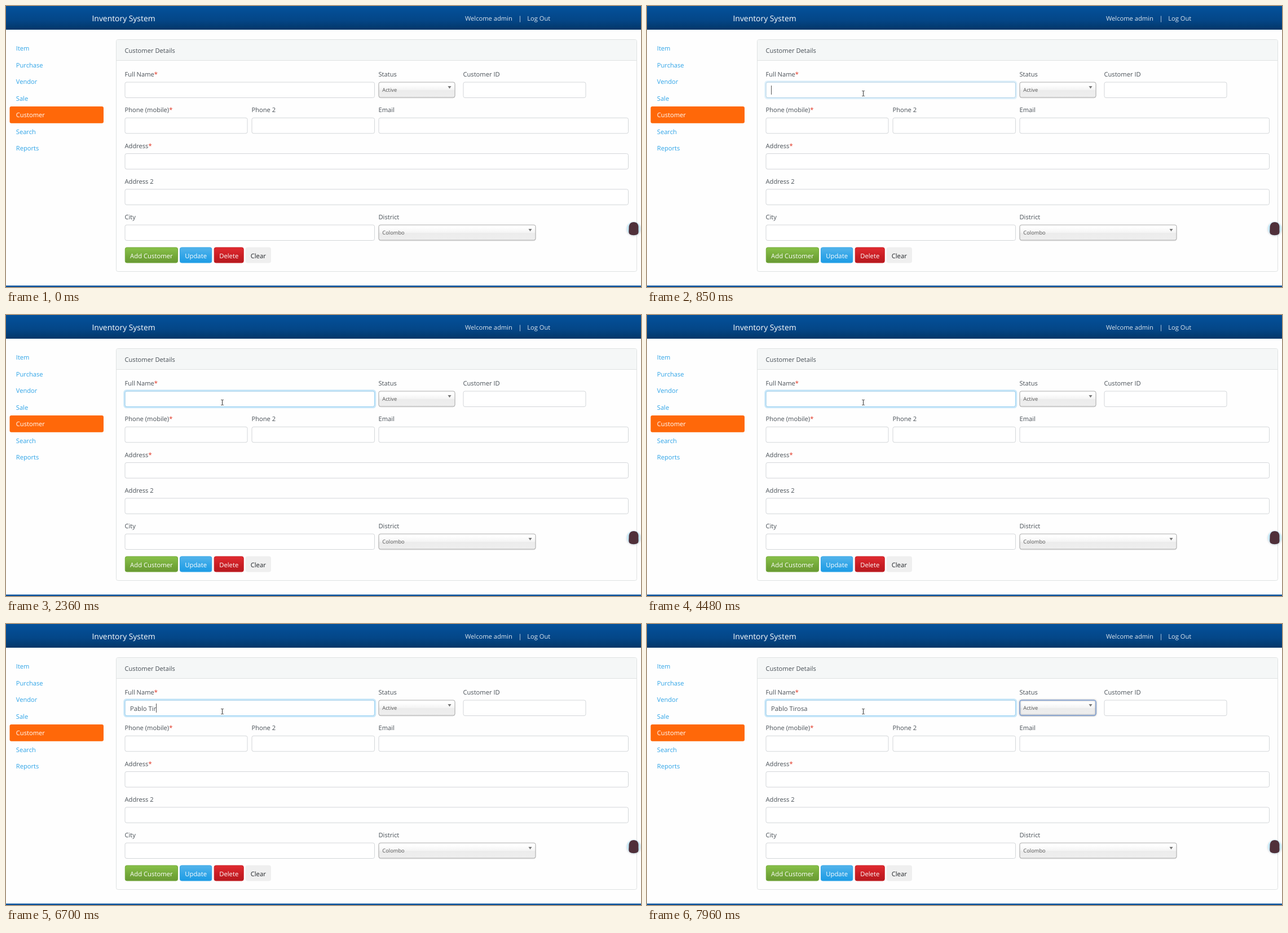
An HTML page for the animation above (8 s loop, 1126 by 498 pixels).

```html
<!DOCTYPE html>
<html lang="en">
<head>
<meta charset="utf-8">
<title>Customer form</title>
<style>
  html, body { margin: 0; width: 100%; height: 100%; overflow: hidden; background: #fefefe; }
  svg { display: block; width: 1126px; height: 498px; }
  text { font: 11.15px "Open Sans", "Noto Sans", sans-serif; fill: #495057; white-space: pre; text-rendering: geometricPrecision; }
  .brand { font-size: 13.9px; fill: #fff; }
  .nav { fill: #dde6ef; }
  .link { fill: #2fa4e7; }
  .small { font-size: 9.3px; fill: #555; }
  .white { fill: #fff; }
  .dark { fill: #212529; }
  .button { text-anchor: middle; font-size: 11.3px; }
  .field { fill: #fff; stroke: #d3d6d9; }
  .select { fill: url(#select); stroke: #aaa; }
  #name { font-size: 11.3px; }
</style>
</head>
<body>
<svg viewBox="0 0 1126 498">
  <defs>
    <linearGradient id="header" x2="0" y2="1"><stop stop-color="#04519b"/><stop offset=".6" stop-color="#044687"/><stop offset="1" stop-color="#033769"/></linearGradient>
    <linearGradient id="green" x2="0" y2="1"><stop stop-color="#88c149"/><stop offset=".6" stop-color="#73a839"/><stop offset="1" stop-color="#699934"/></linearGradient>
    <linearGradient id="blue" x2="0" y2="1"><stop stop-color="#54b4eb"/><stop offset=".6" stop-color="#2fa4e7"/><stop offset="1" stop-color="#1d9ce5"/></linearGradient>
    <linearGradient id="red" x2="0" y2="1"><stop stop-color="#e12b31"/><stop offset=".6" stop-color="#c71c22"/><stop offset="1" stop-color="#b5191f"/></linearGradient>
    <linearGradient id="select" x2="0" y2="1"><stop offset=".15" stop-color="#fff"/><stop offset=".5" stop-color="#f4f4f4"/><stop offset=".53" stop-color="#ececec"/><stop offset="1" stop-color="#eee"/></linearGradient>
    <filter id="soft" x="-50%" y="-50%" width="200%" height="200%"><feGaussianBlur stdDeviation="1.5"/></filter>
  </defs>

  <rect width="1126" height="42" fill="url(#header)"/>
  <text class="brand" x="152.5" y="27">Inventory System</text>
  <text class="nav" x="814" y="26">Welcome admin</text>
  <text class="nav" x="908.5" y="26">|</text>
  <text class="nav" x="924.3" y="26">Log Out</text>
  <rect y="495.5" width="1126" height="2.5" fill="#04519b"/>

  <rect x="195.5" y="59.5" width="923" height="411" rx="3" fill="#fefefe" stroke="#dfe2e2"/>
  <path d="M196 96V62.500q0-2.500 2.500-2.500H1115.500q2.500 0 2.500 2.500V96z" fill="#f5f7f7"/>
  <path d="M196 96.500H1118" stroke="#dfe2e2"/>
  <text x="210.500" y="83">Customer Details</text>

  <g id="form"></g>

  <g id="glow" fill="none">
    <rect x="209.500" y="133.500" width="445.500" height="30.500" rx="4" stroke="#cbe8f9" stroke-width="2.500"/>
    <rect x="211" y="135" width="442.500" height="27.500" rx="3" stroke="#97d1f3"/>
  </g>
  <text id="name" x="220" y="154"></text>
  <rect id="caret" y="141" width="1" height="16" fill="#555"/>

  <g id="statusFocus" fill="none">
    <rect x="661" y="135" width="135" height="27" rx="3.500" stroke="#000" stroke-width="2" opacity=".3" filter="url(#soft)"/>
    <rect x="661" y="135" width="135" height="27" rx="3.500" stroke="#6c9ff0"/>
  </g>

  <circle cx="1113" cy="395.500" r="12.500" fill="#789" opacity=".3" filter="url(#soft)"/>
  <circle cx="1113" cy="394.500" r="12" fill="#c9ecfa"/>
  <path d="M1113 383c6 0 9 4 8.500 10-.3 5 1 8-1 11-4 3-11 3-15 0-2-3-1-6-1-11 0-6 3-10 8.500-10z" fill="#50303a"/>

  <g id="pointer">
    <path id="arrow" d="M0 0V13L3 10.300 5 14.500 7 13.600 5.100 9.600H9z" fill="#fff" stroke="#222" stroke-width=".8"/>
    <path id="beam" d="M-2.200-4.600H-.6L0-4 .6-4.600H2.200M0-4V4M-2.200 4.600H-.6L0 4 .6 4.600H2.200" fill="none" stroke="#333"/>
  </g>
</svg>
<script>
const $ = id => document.getElementById(id);

const label = (x, y, text, cls = '') => `<text class="${cls}" x="${x}" y="${y}">${text}</text>`;
const box = (x, y, w, h, cls, extra = '') =>
  `<rect class="${cls}" x="${x}" y="${y}" width="${w}" height="${h}" rx="3" ${extra}/>`;
const field = (x, y, w, text, required) =>
  label(x - .5, y - 10, text + (required ? '<tspan fill="#e0301e">*</tspan>' : '')) +
  box(x, y, w, 27.5, 'field');
const select = (x, y, w, text, value) =>
  label(x - .5, y - 10, text) +
  `<rect x="${x}" y="${y + 1}" width="${w}" height="27" rx="3.5" fill="none" stroke="#ddd"/>` +
  box(x, y, w, 27, 'select') + label(x + 6.3, y + 16.5, value, 'small') +
  `<path d="M${x + w - 12.5} ${y + 7}h6l-3 4.5z" fill="#777"/>`;
const button = (x, w, text, fill, edge, cls) =>
  box(x, 428, w, 27, '', `fill="${fill}" stroke="${edge}"`) +
  label(x + w / 2, 446.5, text, 'button ' + cls);

const menu = ['Item', 'Purchase', 'Vendor', 'Sale', 'Customer', 'Search', 'Reports'];
$('form').innerHTML =
  box(6.5, 178, 166.5, 29.7, '', 'fill="#ff6809"') +
  menu.map((text, i) => label(17.8, 79.3 + i * 29.5, text, text === 'Customer' ? 'white' : 'link')).join('') +
  field(211, 135, 442.5, 'Full Name', true) +
  select(661, 135, 135, 'Status', 'Active') +
  field(811, 135, 217, 'Customer ID') +
  field(211, 198.3, 217, 'Phone (mobile)', true) +
  field(436, 198.3, 217.5, 'Phone 2') +
  field(661, 198.3, 442.5, 'Email') +
  field(211, 261.6, 892.5, 'Address', true) +
  field(211, 324.8, 892.5, 'Address 2') +
  field(211, 388, 442.5, 'City') +
  select(661, 388, 278, 'District', 'Colombo') +
  button(211.3, 93.2, 'Add Customer', 'url(#green)', '#73a839', 'white') +
  button(308.5, 56.3, 'Update', 'url(#blue)', '#2fa4e7', 'white') +
  button(369.2, 52, 'Delete', 'url(#red)', '#c71c22', 'white') +
  button(425, 44.5, 'Clear', '#efefef', '#efefef', 'dark');

const fullName = 'Pablo Tirosa';
const keyTimes = [4750, 4950, 5560, 5630, 5770, 6050, 6310, 6440, 6700, 6840, 6970, 7490];
const caretToggles = [770, 1360, 1830, 2360, 2890, 3420, 3950, 4480, 4750, 5490, 5560, 7960];
const glowSteps = [[770, .2], [840, .6], [910, .92], [970, 1]];
const pointerSteps = [
  [280, 806, 360, 'arrow'], [350, 640, 268, 'beam'], [420, 500, 190, 'arrow'],
  [490, 420, 152, 'beam'], [560, 390, 146, 'beam'], [630, 383.5, 155, 'beam']
];

const passed = (times, t) => times.filter(time => time <= t).length;
const latest = (steps, t) => steps.filter(step => step[0] <= t).pop();
const show = (id, visible) => $(id).setAttribute('visibility', visible ? 'visible' : 'hidden');

let typed = -1;
function draw(t) {
  const count = passed(keyTimes, t);
  if (count !== typed) {
    typed = count;
    $('name').textContent = fullName.slice(0, count);
    $('caret').setAttribute('x', 220 + Math.round(count ? $('name').getComputedTextLength() : 0));
  }
  show('caret', passed(caretToggles, t) % 2);
  show('statusFocus', t >= 7960);

  const glow = latest(glowSteps, t);
  $('glow').setAttribute('opacity', glow ? glow[1] : 0);

  const [, x, y, shape] = latest(pointerSteps, t) || [0, 0, 0, ''];
  $('pointer').setAttribute('transform', `translate(${x} ${y})`);
  show('arrow', shape === 'arrow');
  show('beam', shape === 'beam');
}

const start = performance.now();
function tick() {
  draw((performance.now() - start) % 8000);
  requestAnimationFrame(tick);
}
tick();
</script>
</body>
</html>
```
